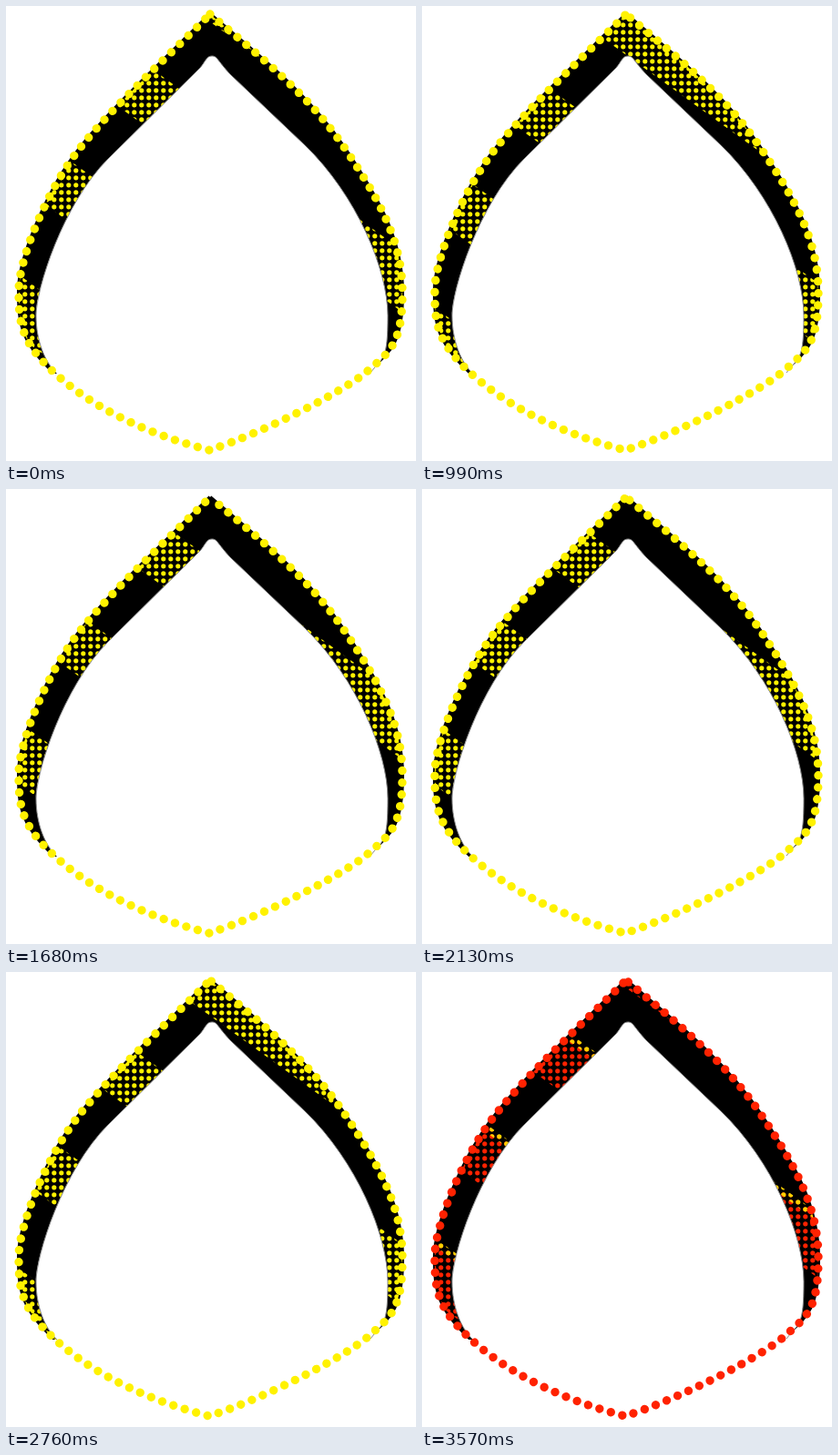
Recreate the animation shown at these times as an HTML page with a canvas. Size 450 px wide and 500 px high, loop 3.6 s.

```html
<!DOCTYPE html>
<html>
<head>
<meta charset="utf-8">
<style>
html, body { margin: 0; width: 450px; height: 500px; overflow: hidden; background: #fff; }
canvas { display: block; }
</style>
</head>
<body>
<canvas id="stage" width="450" height="500"></canvas>
<script>
const ctx = document.getElementById('stage').getContext('2d');
const W = 450, H = 500;
const STEP = 30, STEPS = 120;
const YELLOW = '#fff200', RED = '#ff2200', AMBER = '#ffd000';

const BEADS_PER_SIDE = 52, BEAD_SIZE = 9.4, BEAD_SPEED = 0.1072;
const SLOPE = 0.725, STRIPE_PERIOD = 166, STRIPE_HEIGHT = 68, STRIPE_START = -47, STRIPE_SPEED = 11.16;
const GRID = 8, GRID_OFFSET = 4.8, GRID_RADIUS = 2.6;

// Outline: clockwise from the top point to the bottom point and back.
const rightSide = 'M224 9 C277 54 332 97 371 155 S435 258 435 315 S421 380 397 401 S285 468 223 488';
const leftSide = 'C165 473 106 448 61 410 S14 349 14 313 S46 200 82 155 S176 57 224 9';
const opening = 'M56 404 C43 392 33 368 33 340 S62 218 112 168 L213 68 C219 61 220 55 226 55 '
  + 'S232 60 246 75 L328 153 C385 208 419 290 419 340 S414 385 400 403';

const outline = new Path2D(rightSide + leftSide);
const innerEdge = new Path2D(opening);
const innerShape = new Path2D(opening + 'H418 L450 500 H0 L38 404 Z');

function pathLength(d) {
  const path = document.createElementNS('http://www.w3.org/2000/svg', 'path');
  path.setAttribute('d', d);
  return path.getTotalLength();
}
const spacing = pathLength(rightSide) / BEADS_PER_SIDE;

const screen = new Path2D();
for (let x = GRID_OFFSET; x < W; x += GRID) {
  for (let y = GRID_OFFSET; y < H; y += GRID) {
    screen.moveTo(x + GRID_RADIUS, y);
    screen.arc(x, y, GRID_RADIUS, 0, 2 * Math.PI);
  }
}

// Shows the dot screen inside repeated slanted bands.
function drawStripes(top, height, color) {
  const bands = new Path2D();
  for (let y = top % STRIPE_PERIOD - 4 * STRIPE_PERIOD; y < H; y += STRIPE_PERIOD) {
    bands.moveTo(0, y);
    bands.lineTo(W, y + SLOPE * W);
    bands.lineTo(W, y + height + SLOPE * W);
    bands.lineTo(0, y + height);
    bands.closePath();
  }
  ctx.save();
  ctx.clip(outline);
  ctx.clip(bands);
  ctx.fillStyle = color;
  ctx.fill(screen);
  ctx.restore();
}

function strokePath(path, width, color) {
  ctx.lineWidth = width;
  ctx.strokeStyle = color;
  ctx.stroke(path);
}

// Tiny dashes with round caps become beads that travel along the outline.
function drawBeads(shift, color) {
  ctx.save();
  ctx.lineCap = 'round';
  ctx.setLineDash([0.01, spacing - 0.01]);
  ctx.lineDashOffset = shift * spacing;
  strokePath(outline, BEAD_SIZE, color);
  ctx.restore();
}

function draw(step) {
  const flash = step === STEPS - 1;
  const color = flash ? RED : YELLOW;
  const top = STRIPE_START + STRIPE_SPEED * step;

  ctx.fillStyle = '#fff';
  ctx.fillRect(0, 0, W, H);
  ctx.lineJoin = 'round';
  ctx.fillStyle = '#000';
  ctx.fill(outline);
  strokePath(outline, 4, '#000');

  drawStripes(top, STRIPE_HEIGHT, color);
  if (flash) {
    ctx.save();
    drawStripes(top - 3, 9, AMBER);
    ctx.restore();
  }

  ctx.fillStyle = '#fff';
  ctx.fill(innerShape);
  strokePath(innerEdge, 1, '#888');
  drawBeads(BEAD_SPEED * step, color);
}

function tick() {
  draw(Math.floor(performance.now() / STEP) % STEPS);
  requestAnimationFrame(tick);
}
tick();
</script>
</body>
</html>
```
